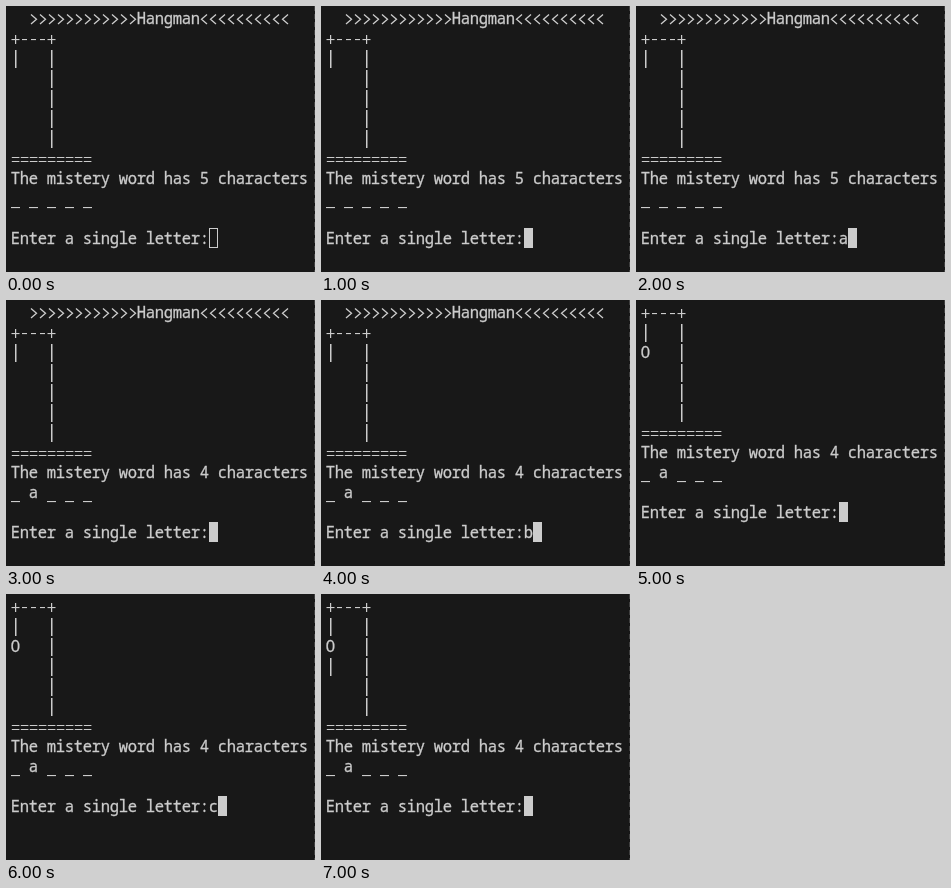
Recreate the animation shown at these times as an HTML page with a canvas. Size 309 px wide and 266 px high, loop 8 s.

```html
<!DOCTYPE html>
<html lang="en">
<head>
<meta charset="utf-8">
<title>Terminal word game</title>
<style>
  html, body { margin: 0; width: 100%; height: 100%; overflow: hidden; background: #181818; }
  canvas { display: block; width: 309px; height: 266px; }
</style>
</head>
<body>
<canvas id="stage" width="309" height="266"></canvas>
<script>
const ctx = document.getElementById('stage').getContext('2d');
const WIDTH = 309, HEIGHT = 266;
const BACK = '#181818', INK = '#cccccc', EDGE = '#404040';
const LEFT = 5, TOP = 2, CELL = 9, ROW = 20, BASELINE = 16;
const STEP = 1000, LOOP = 8000;
const TITLE = '  ' + '>'.repeat(12) + 'Hangman' + '<'.repeat(10);
const PROMPT = 'Enter a single letter:';

const gallows = (head = ' ', body = ' ') =>
  ['+---+', '|   |', `${head}   |`, `${body}   |`, '    |', '    |', '='.repeat(9)];

const screen = (header, figure, left, word) =>
  [...header, ...figure, `The mistery word has ${left} characters`, word, '', PROMPT];

const opening = screen([TITLE], gallows(), 5, '_ _ _ _ _');
const firstHit = screen([TITLE], gallows(), 4, '_ a _ _ _');
const oneMiss = screen([], gallows('O'), 4, '_ a _ _ _');
const twoMisses = screen([], gallows('O', '|'), 4, '_ a _ _ _');

// One entry per step: screen lines, typed letter, hollow cursor
const steps = [
  [opening, '', true],
  [opening, ''],
  [opening, 'a'],
  [firstHit, ''],
  [firstHit, 'b'],
  [oneMiss, ''],
  [oneMiss, 'c'],
  [twoMisses, '']
];

function drawChevron(x, y, back, tip) {
  ctx.lineWidth = 1.3;
  ctx.beginPath();
  ctx.moveTo(x + back, y + 6.5);
  ctx.lineTo(x + tip, y + 11.2);
  ctx.lineTo(x + back, y + 15.9);
  ctx.stroke();
}

// Symbols that line up with the cell grid are drawn as strokes
const symbols = {
  '|': (x, y) => ctx.fillRect(x + 4, y + 2, 1.5, 18),
  '_': (x, y) => ctx.fillRect(x, y + 19, 9, 1.1),
  '-': (x, y) => ctx.fillRect(x + 2, y + 11, 5, 1.1),
  '+': (x, y) => {
    ctx.fillRect(x + 0.5, y + 11, 8, 1.1);
    ctx.fillRect(x + 4, y + 7, 1.2, 9);
  },
  '=': (x, y) => {
    ctx.fillRect(x + 0.8, y + 9, 7.6, 1);
    ctx.fillRect(x + 0.8, y + 13, 7.6, 1);
  },
  '>': (x, y) => drawChevron(x, y, 2, 7.5),
  '<': (x, y) => drawChevron(x, y, 7, 1.5)
};

function drawGlyph(char, x, y) {
  if (symbols[char]) return symbols[char](x, y);
  ctx.lineWidth = 0.3;
  ctx.fillText(char, x + CELL / 2, y + BASELINE);
  ctx.strokeText(char, x + CELL / 2, y + BASELINE);
}

function drawLine(text, row) {
  [...text].forEach((char, col) => drawGlyph(char, LEFT + col * CELL, TOP + row * ROW));
}

function drawCursor(col, row, hollow) {
  const x = LEFT + col * CELL, y = TOP + row * ROW;
  ctx.lineWidth = 1;
  if (hollow) ctx.strokeRect(x + 0.5, y + 0.5, CELL - 1, ROW - 1);
  else ctx.fillRect(x, y, CELL, ROW);
}

function drawEdge() {
  ctx.fillStyle = EDGE;
  for (let y = 0; y < HEIGHT; y += 8) ctx.fillRect(WIDTH - 1, y, 1, 5);
}

function render(time) {
  const [lines, typed, hollow] = steps[Math.floor((time % LOOP) / STEP)];
  const last = lines.length - 1;
  ctx.fillStyle = BACK;
  ctx.fillRect(0, 0, WIDTH, HEIGHT);
  drawEdge();
  ctx.fillStyle = ctx.strokeStyle = INK;
  ctx.textAlign = 'center';
  ctx.font = '15.5px "Noto Sans Mono", "DejaVu Sans Mono", monospace';
  lines.forEach((line, row) => drawLine(row === last ? line + typed : line, row));
  drawCursor(PROMPT.length + typed.length, last, hollow);
}

const start = performance.now();
function tick() {
  render(performance.now() - start);
  requestAnimationFrame(tick);
}
tick();
</script>
</body>
</html>
```
